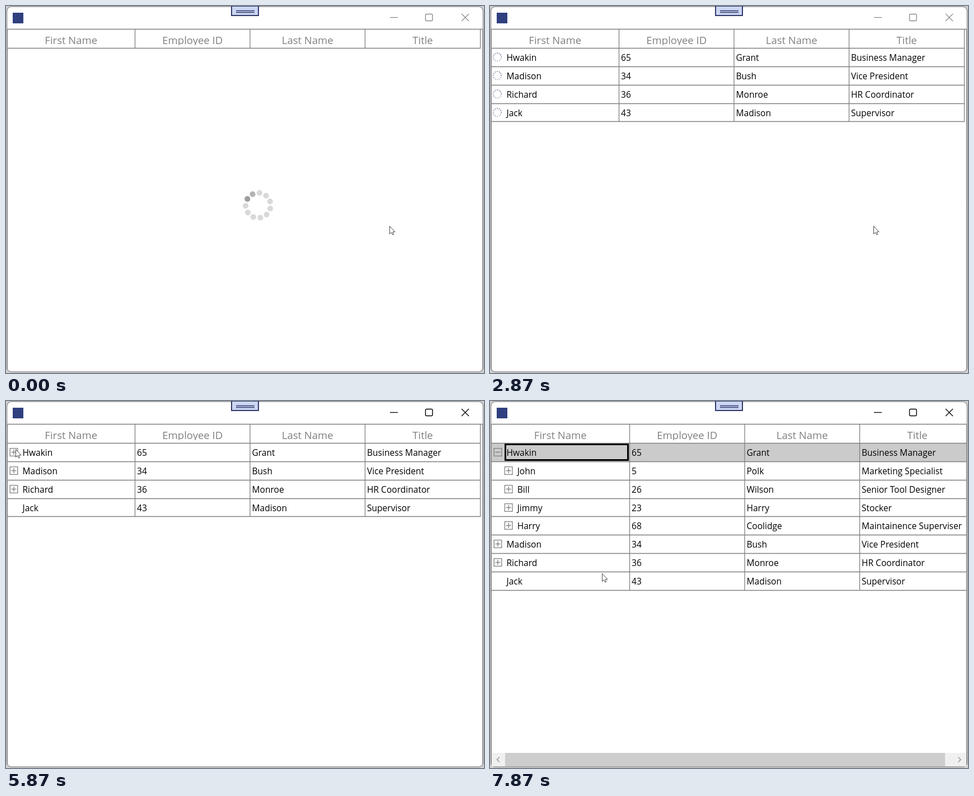
Recreate the animation shown at these times as an HTML page with a canvas. Size 854x656 px, loop 8000 ms.

```html
<!DOCTYPE html>
<html lang="en">
<head>
<meta charset="utf-8">
<title>Tree grid loading</title>
<style>
html, body { margin: 0; width: 100%; height: 100%; overflow: hidden; background: #fff; }
canvas { display: block; }
</style>
</head>
<body>
<canvas width="854" height="656"></canvas>
<script>
const ctx = document.querySelector('canvas').getContext('2d');
const LOOP = 8000, FPS = 15;
const GRID = '#808080', NAVY = '#2f3f7f', TAB = '#323a6b';
const FONT = '"Open Sans", "Noto Sans", sans-serif';
const rowTop = index => Math.floor(75.4 + index * 32.87);

// Moments at which the interface changes, in ms
const EVENTS = { busyEnd: 2130, rows: 2260, rootsReady: 4195, activate: 5730, expand: 5930, childrenReady: 7860 };

const HEADERS = ['First Name', 'Employee ID', 'Last Name', 'Title'];
const ROOTS = [
  ['Hwakin', '65', 'Grant', 'Business Manager'],
  ['Madison', '34', 'Bush', 'Vice President'],
  ['Richard', '36', 'Monroe', 'HR Coordinator'],
  ['Jack', '43', 'Madison', 'Supervisor']
];
const CHILDREN = [
  ['John', '5', 'Polk', 'Marketing Specialist'],
  ['Bill', '26', 'Wilson', 'Senior Tool Designer'],
  ['Jimmy', '23', 'Harry', 'Stocker'],
  ['Harry', '68', 'Coolidge', 'Maintainence Superviser']
];
// Pointer path: time, x, y
const POINTER = [
  [4200, 685, 393], [4330, 640, 388], [4466, 492, 346], [4666, 210, 240], [4800, 72, 162],
  [5066, 32, 110], [5530, 17, 86], [6066, 17, 86], [6400, 90, 170], [6800, 184, 258],
  [7130, 199, 298], [7400, 200, 308]
];

const clamp = v => Math.max(0, Math.min(1, v));
const gray = v => `rgb(${v},${v},${v})`;

function rect(x, y, w, h, color) {
  ctx.fillStyle = color;
  ctx.fillRect(x, y, w, h);
}

function path(points, color, width = 1.3) {
  ctx.beginPath();
  points.forEach(([x, y]) => ctx.lineTo(x, y));
  ctx.strokeStyle = color;
  ctx.lineWidth = width;
  ctx.stroke();
}

function box(x, y, w, h, color, width, radius = 0) {
  ctx.beginPath();
  ctx.roundRect(x, y, w, h, radius);
  ctx.strokeStyle = color;
  ctx.lineWidth = width;
  ctx.stroke();
}

function dot(x, y, r, color) {
  ctx.beginPath();
  ctx.arc(x, y, r, 0, 2 * Math.PI);
  ctx.fillStyle = color;
  ctx.fill();
}

function label(text, x, y, size, color, align = 'left') {
  ctx.font = `${size}px ${FONT}`;
  ctx.textAlign = align;
  ctx.fillStyle = color;
  ctx.fillText(text, x, y);
}

function drawWindow(t) {
  rect(0, 0, 854, 656, '#d2d2d2');
  ctx.beginPath();
  ctx.roundRect(1.5, 1, 851, 653, 8);
  ctx.fillStyle = '#fff';
  ctx.fill();
  box(1.5, 1, 851, 653, '#a6a6a6', 2, 8);

  rect(12, 12, 19, 19, NAVY);
  rect(402, 0, 50, 18, TAB);
  rect(404, 1, 46, 15, '#ccd6f2');
  path([[411, 8.5], [444, 8.5]], TAB);
  path([[411, 11.5], [444, 11.5]], TAB);

  const ink = gray(Math.round(140 * (1 - clamp((t - EVENTS.activate + 65) / 200))));
  path([[686, 20.5], [700, 20.5]], ink);
  box(749.5, 14.5, 12.5, 12, ink, 1.4, 2);
  path([[814, 14], [827, 27]], ink);
  path([[827, 14], [814, 27]], ink);
}

function drawBusy(t) {
  const count = 11, head = 9.39 + t * 0.00891;
  for (let i = 0; i < count; i++) {
    const ahead = (((i - head) % count) + count) % count;
    const strength = Math.max(0, 1 - Math.min(ahead, count - ahead));
    const angle = 0.11 + i * 2 * Math.PI / count;
    dot(450.5 + 22.4 * Math.sin(angle), 356.4 - 22.4 * Math.cos(angle), 5.1, gray(Math.round(217 - 97 * strength)));
  }
}

function drawRowSpinner(x, y, t) {
  const count = 12;
  for (let i = 0; i < count; i++) {
    const age = (((t / 1230 - i / count) % 1) + 1) % 1;
    const angle = i * 2 * Math.PI / count;
    dot(x + 7.2 * Math.sin(angle), y - 7.2 * Math.cos(angle), 1.1, `rgba(105,115,150,${0.9 - 0.45 * age})`);
  }
}

function drawExpander(x, y, open) {
  box(x - 6.8, y - 6.8, 13.6, 13.6, GRID, 1.3);
  path([[x - 4.5, y], [x + 4.5, y]], GRID, 1.4);
  if (!open) path([[x, y - 4.5], [x, y + 4.5]], GRID, 1.4);
}

function drawRow(row, index, columns, t) {
  const { cells, child, open, leaf, ready } = row;
  const top = rowTop(index);
  const middle = top + 16.5, indent = child ? 19.2 : 0;
  if (open) {
    rect(3, top, 848, 33, '#cbcbcb');
    box(27.5, top + 2.5, 219, 28, '#000', 3);
  }
  if (!ready) drawRowSpinner(13 + indent, middle - 0.2, t);
  else if (!leaf) drawExpander(14 + indent, middle, open);
  cells.forEach((text, c) => {
    const x = c ? columns[c - 1] + 3.5 : 29.5 + indent;
    label(text, x, top + 23, 15.55, '#000');
  });
}

function drawGrid(t) {
  const expanded = t >= EVENTS.expand;
  const shift = expanded ? 19 : 0;
  const columns = [230.5, 436, 641.5, 847.5].map(x => x + shift);
  const right = Math.min(columns[3], 851);

  const rows = t < EVENTS.rows ? [] : ROOTS.map((cells, i) => ({
    cells, open: expanded && i === 0, leaf: i === 3, ready: t >= EVENTS.rootsReady
  }));
  if (expanded) {
    rows.splice(1, 0, ...CHILDREN.map(cells => ({ cells, child: true, ready: t >= EVENTS.childrenReady })));
  }
  rows.forEach((row, i) => drawRow(row, i, columns, t));

  path([[2, 41.5], [851, 41.5]], GRID);
  path([[2.5, 41], [2.5, 650]], GRID, 1);
  path([[851.5, 41], [851.5, 650]], GRID, 1);
  for (let i = 0; i <= rows.length; i++) {
    const y = rowTop(i) + 0.5;
    path([[3, y], [right, y]], GRID);
  }
  const bottom = rowTop(rows.length) + 1;
  columns.filter(x => x < 851).forEach(x => path([[x, 41], [x, bottom]], GRID));

  ctx.save();
  ctx.beginPath();
  ctx.rect(3, 42, 848, 28);
  ctx.clip();
  HEADERS.forEach((text, c) => {
    const left = c ? columns[c - 1] : 2;
    label(text, (left + columns[c]) / 2, 68, 18.5, GRID, 'center');
  });
  ctx.restore();

  if (expanded) drawScrollbar();
}

function drawScrollbar() {
  rect(3, 629, 848, 24, '#f0f0f0');
  rect(27, 629, 786, 24, '#cdcdcd');
  path([[17, 636.5], [12.5, 641], [17, 645.5]], '#999', 1.5);
  path([[836.5, 636.5], [841, 641], [836.5, 645.5]], '#999', 1.5);
}

function pointerAt(t) {
  const next = POINTER.findIndex(p => p[0] > t);
  if (next === 0) return POINTER[0].slice(1);
  if (next < 0) return POINTER.at(-1).slice(1);
  const [t0, x0, y0] = POINTER[next - 1], [t1, x1, y1] = POINTER[next];
  const k = (t - t0) / (t1 - t0);
  return [x0 + (x1 - x0) * k, y0 + (y1 - y0) * k];
}

function drawPointer(t) {
  const [x, y] = pointerAt(t).map(Math.round);
  ctx.save();
  ctx.translate(x + 0.5, y + 0.5);
  ctx.beginPath();
  [[0, 0], [0, 14], [3.2, 11.2], [5.2, 15.5], [7.2, 14.6], [5.3, 10.4], [9.5, 10.2]].forEach(p => ctx.lineTo(...p));
  ctx.closePath();
  ctx.fillStyle = '#fff';
  ctx.fill();
  ctx.strokeStyle = '#333';
  ctx.lineWidth = 0.9;
  ctx.stroke();
  ctx.restore();
}

function render(now) {
  const tick = Math.floor((now % LOOP + 4) * FPS / 1000);
  const t = Math.min(tick, 118) * 1000 / FPS;
  drawWindow(t);
  drawGrid(t);
  if (t < EVENTS.busyEnd) drawBusy(t);
  drawPointer(t);
}

const start = performance.now();
function frame() {
  render(performance.now() - start);
  requestAnimationFrame(frame);
}
frame();
</script>
</body>
</html>
```
